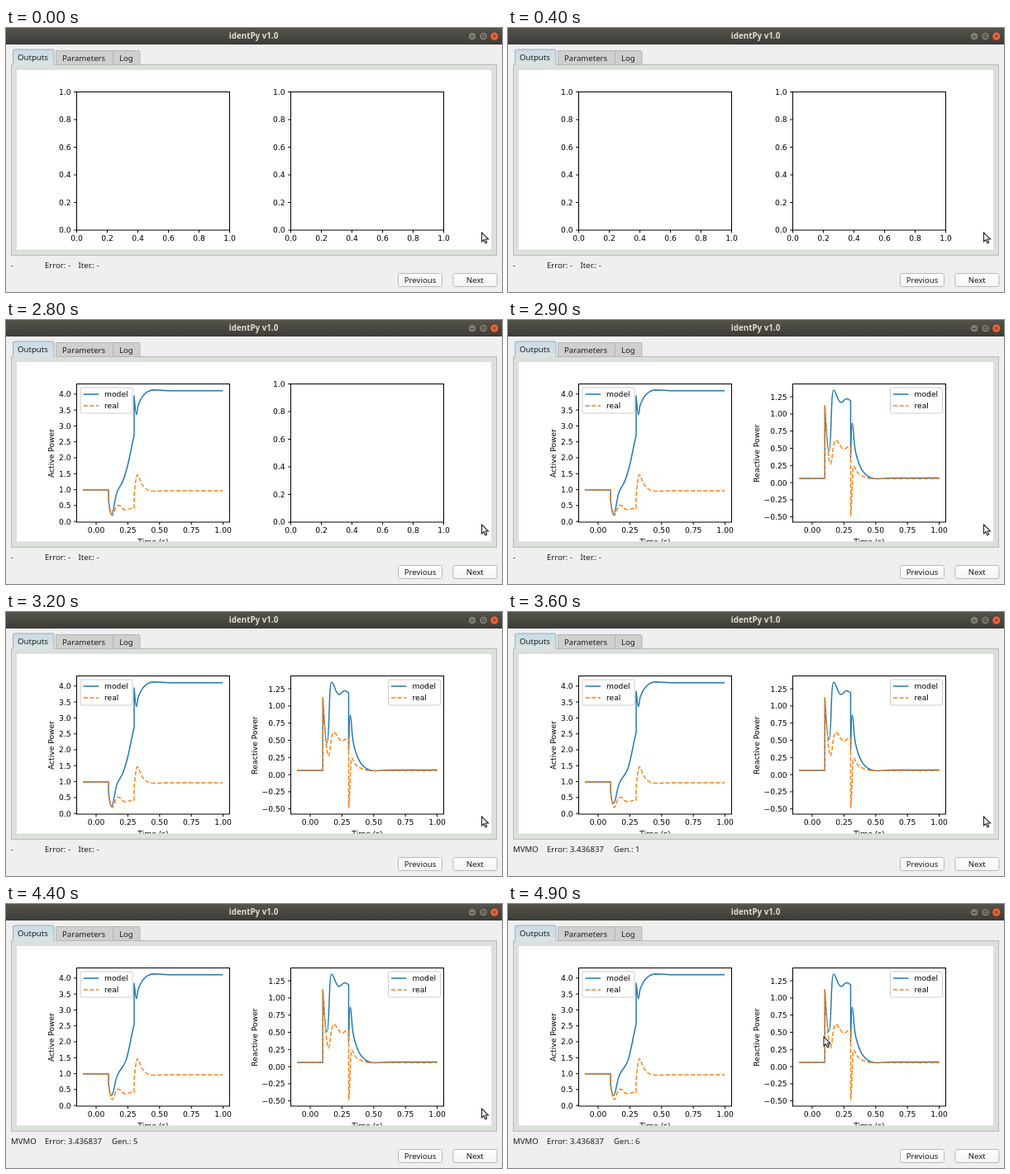
Animation, 600 px wide and 320 px high, one loop 5 s. Source, as an HTML page:

```html
<!DOCTYPE html>
<html lang="en">
<head>
<meta charset="utf-8">
<title>identPy v1.0</title>
<style>
  html, body { margin: 0; width: 100%; height: 100%; overflow: hidden; background: #f0efef; }
  svg { display: block; width: 600px; height: 320px; }
  .ui { font: 9.6px "Noto Sans", sans-serif; fill: #1c1c1c; }
  .title { font: bold 9.8px "Noto Sans", sans-serif; fill: #e1dcd1; }
  .plot { font: 9.2px "DejaVu Sans", sans-serif; fill: #000; }
  .curve { fill: none; stroke-width: 1.45; stroke-linejoin: round; }
  .model { stroke: #1f77b4; }
  .real { stroke: #ff7f0e; stroke-dasharray: 5.3 2.3; }
  .axis { fill: none; stroke: #000; stroke-width: 1; }
  .mid { text-anchor: middle; }
  .end { text-anchor: end; }
</style>
</head>
<body>
<svg viewBox="0 0 600 320">
  <defs>
    <linearGradient id="bar" x2="0" y2="1">
      <stop stop-color="#55534b"/><stop offset="1" stop-color="#3d3b37"/>
    </linearGradient>
    <linearGradient id="activeTab" x2="0" y2="1">
      <stop stop-color="#c6dbe6"/><stop offset="1" stop-color="#dbe3e4"/>
    </linearGradient>
    <linearGradient id="button" x2="0" y2="1">
      <stop stop-color="#fefefe"/><stop offset="1" stop-color="#f3f3f3"/>
    </linearGradient>
    <clipPath id="canvas"><rect x="13" y="51" width="574" height="217.5"/></clipPath>
  </defs>

  <rect width="600" height="320" fill="#f0efef"/>
  <rect width="600" height="20" fill="url(#bar)"/>
  <text class="title mid" x="299.5" y="13.3">identPy v1.0</text>
  <g stroke="#37352f" stroke-width=".8">
    <circle cx="564" cy="10" r="5" fill="#7d7a70"/>
    <circle cx="577.5" cy="10" r="5" fill="#7d7a70"/>
    <circle cx="590.8" cy="10" r="5.2" fill="#ea6336"/>
    <path d="M562 10.5h4M575.8 8.3h3.4v3.4h-3.4zM589 8.2l3.6 3.6m0-3.6l-3.6 3.6" fill="none"/>
  </g>

  <rect x="6.5" y="44.5" width="587" height="231" fill="#dce0db" stroke="#b9bcb8"/>
  <g stroke="#b4b6b3">
    <path d="M60.5 44.5V27.5H129.5V44.5zM129.5 44.5V27.5H160q2 0 2 2V44.5z" fill="#cfd0cd"/>
    <path d="M8.5 45V28q0-2 2-2H56q2 0 2 2V45" fill="url(#activeTab)" stroke="#9fb1ba"/>
  </g>
  <g class="ui">
    <text x="14" y="39.2">Outputs</text>
    <text x="68" y="39.8">Parameters</text>
    <text x="137" y="39.8">Log</text>
  </g>
  <rect x="13" y="51" width="574" height="217.5" fill="#fff"/>
  <g id="plots" class="plot" clip-path="url(#canvas)"></g>

  <g fill="url(#button)" stroke="#b9b9b9">
    <rect x="474.5" y="297.5" width="53" height="16" rx="2"/>
    <rect x="541" y="297.5" width="53" height="16" rx="2"/>
  </g>
  <g class="ui">
    <text class="mid" x="501" y="309.3">Previous</text>
    <text class="mid" x="567.3" y="309.3">Next</text>
    <text id="method" x="6" y="290.6"></text>
    <text id="error" x="47" y="290.6"></text>
    <text id="count" y="290.6"></text>
  </g>
  <path id="cursor" d="M0 0V11L2.6 8.7L4.3 12.7L6.2 11.9L4.5 8H8z" fill="#fff" stroke="#222" stroke-width="1.1"/>
</svg>

<script>
const LOOP = 5000, LEFT_AT = 2800, RIGHT_AT = 2900, FIT_AT = 3500;
const GENERATIONS = [FIT_AT, 3800, 4000, 4200, 4400, 4700];
const MOVE = { start: 4500, end: 4900, from: [575.5, 248], to: [382, 161] };
const $ = id => document.getElementById(id);

const text = (x, y, label, cls) => `<text class="${cls}" x="${x}" y="${y}">${label}</text>`;
const range = (n, fn) => Array.from({ length: n }, (_, i) => fn(i)).join("");
const label = (v, digits) => v.toFixed(digits).replace("-", "\u2212");
const curve = (cls, d, id = "") => `<path id="${id}" class="curve ${cls}" d="${d}"/>`;

// Each axis is described by tick count, first pixel, pixel step, first value, value step and digits.
function axes(left, x, y) {
  const xTicks = range(x.n, i => {
    const px = x.at + i * x.gap;
    return `<path class="axis" d="M${px} 245v3.3"/>` + text(px, 258.4, label(x.from + i * x.by, x.digits), "mid");
  });
  const yTicks = range(y.n, i => {
    const py = y.at - i * y.gap;
    return `<path class="axis" d="M${left} ${py}h-3.3"/>` + text(left - 6.8, py + 3.4, label(y.from + i * y.by, y.digits), "end");
  });
  return xTicks + yTicks + `<rect class="axis" x="${left}" y="77.5" width="185" height="167.5"/>`;
}

const emptyAxes = left => axes(left,
  { n: 6, at: left, gap: 37, from: 0, by: .2, digits: 1 },
  { n: 6, at: 245, gap: 33.5, from: 0, by: .2, digits: 1 });

const timeAxes = (left, y) => axes(left,
  { n: 5, at: left + 23.5, gap: 38.4, from: 0, by: .25, digits: 2 }, y);

const captions = (left, name, x) =>
  `<text class="mid" transform="translate(${x} 161.5) rotate(-90)">${name}</text>` +
  text(left + 92.5, 271.6, "Time (s)", "mid");

const legend = x =>
  `<rect x="${x}" y="82" width="63" height="31" rx="2" fill="#fff" fill-opacity=".8" stroke="#ccc"/>` +
  curve("model", `M${x + 3.5} 90h18.5`) + text(x + 29, 93.2, "model", "") +
  curve("real", `M${x + 3.5} 104h18.5`) + text(x + 29, 107.3, "real", "");

const activeModel = fitted => {
  const [dip, step, peak] = fitted ? [232, 146, 96] : [235.5, 140, 92];
  return `M93 206H124V217Q125.5 ${dip} 127.5 ${dip}C130.5 ${dip} 131 216 135 207
    C138 200 141 200 145 ${step + 44}C149 ${step + 32} 151 ${step + 16} 155 ${step}V${peak}
    C156 102 156.5 114.5 157.7 114.5C158.8 114 158.7 107 160 103C164 92 170 85 179 84.8
    C187 84.8 192 85.8 202 85.8H262`;
};
const activeReal = `M93 206H124V217C126 231 127 237 128.5 237C131 237 131.5 224.5 136 224.5
  C139 224.5 140 230.5 145 230C149 229.5 150 228 155 228.2V212C156.5 198 157.5 187.5 159 187.5
  C162 188 162 207.5 179 207.5C189 207.5 192 207 202 207H262`;

const reactiveModel = fitted => {
  const dip = fitted ? 154.5 : 159;
  return `M352 192H383.3V104C384.5 128 386.5 ${dip} 388.4 ${dip}C391.2 ${dip} 390.5 85 393.8 85
    C397 85 398.5 100 403 100C406 100 406.5 95 410 95.5Q412.5 96 414.5 98V167
    C415 152 415.2 125 416.4 125C418 125 417.8 148 420.5 160C424 176 430 192.6 446 192.6
    C453 192.6 455 191.5 466 191.5H521.5`;
};
const reactiveReal = `M352 192H383.3V104C385 128 387.5 174.5 390 174.5C392.5 174.5 392.5 146 396.8 146
  C400 146 402.5 156.5 406.5 156.5C410 156.5 410 151.5 414.5 153.5V237
  C416.2 230 416.3 177 418.2 177C420 177 420.5 184 425 187C430 190.5 435 192.3 446 192.2H521.5`;

const group = (id, content) => `<g id="${id}">${content}</g>`;
$("plots").innerHTML =
  group("leftEmpty", emptyAxes(85.5)) +
  group("rightEmpty", emptyAxes(344.5)) +
  group("leftPlot",
    curve("model", "", "active") + curve("real", activeReal) +
    timeAxes(85.5, { n: 9, at: 244.2, gap: 19.3, from: 0, by: .5, digits: 1 }) +
    captions(85.5, "Active Power", 58.2) + legend(90)) +
  group("rightPlot",
    curve("model", "", "reactive") + curve("real", reactiveReal) +
    timeAxes(344.5, { n: 8, at: 238.7, gap: 20.8, from: -.5, by: .25, digits: 2 }) +
    captions(344.5, "Reactive Power", 303.5) + legend(462.5));

const show = (id, on) => $(id).setAttribute("display", on ? "inline" : "none");

function render(t) {
  const left = t >= LEFT_AT, right = t >= RIGHT_AT, fitted = t >= FIT_AT;
  show("leftEmpty", !left);
  show("leftPlot", left);
  show("rightEmpty", !right);
  show("rightPlot", right);
  $("active").setAttribute("d", activeModel(fitted));
  $("reactive").setAttribute("d", reactiveModel(fitted));

  const generation = GENERATIONS.filter(start => t >= start).length;
  $("method").textContent = fitted ? "MVMO" : "-";
  $("error").textContent = fitted ? "Error: 3.436837" : "Error: -";
  $("count").textContent = fitted ? `Gen.: ${generation}` : "Iter.: -";
  $("count").setAttribute("x", fitted ? 128 : 87.5);

  // The screen updates ten times per second, so the pointer moves in steps.
  const step = Math.floor(t / 100) * 100;
  const p = Math.min(1, Math.max(0, (step - MOVE.start) / (MOVE.end - MOVE.start)));
  const eased = p * p * (3 - 2 * p);
  const [x, y] = MOVE.from.map((a, i) => a + (MOVE.to[i] - a) * eased);
  $("cursor").setAttribute("transform", `translate(${x} ${y})`);
}

const origin = performance.now();
function tick() {
  render((performance.now() - origin) % LOOP);
  requestAnimationFrame(tick);
}
tick();
</script>
</body>
</html>
```
